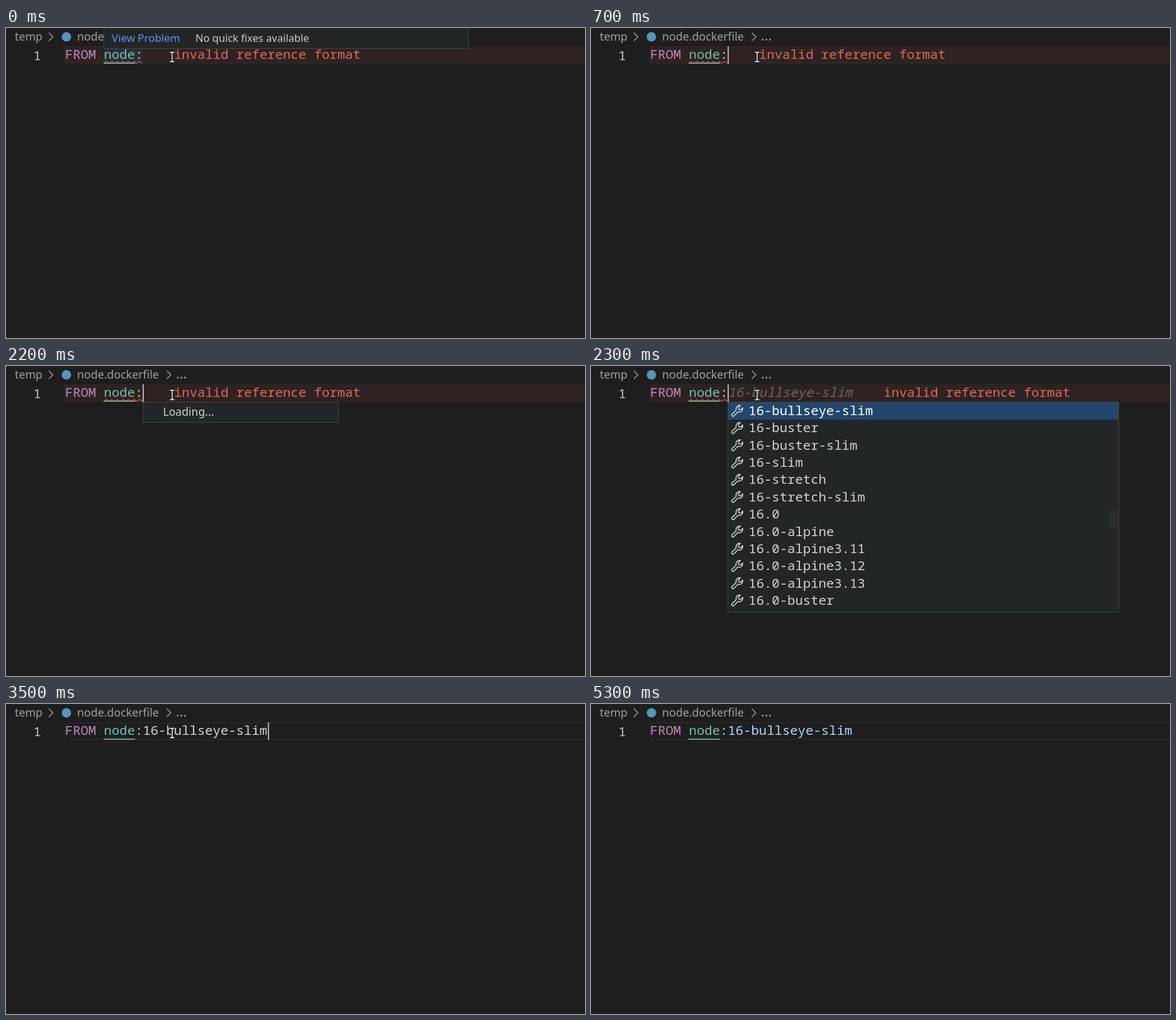
Animation of 920x492 px, one loop 5.6 s. Source, as an HTML page:

```html
<!DOCTYPE html>
<html lang="en">
<head>
<meta charset="utf-8">
<title>Image tag completion</title>
<style>
  html, body { margin: 0; width: 100%; height: 100%; overflow: hidden; background: #1e1e1e; }
  svg { display: block; width: 100%; height: 100%; }
  text { white-space: pre; }
  .code { font: 20.6px "Noto Sans Mono", "DejaVu Sans Mono", monospace; fill: #d4d4d4; }
  .ui { font: 17.8px "Noto Sans", "Open Sans", sans-serif; fill: #a0a0a0; }
  .panel { fill: #232626; stroke: #454545; }
  .line { fill: none; stroke: #a0a0a0; stroke-width: 1.4; }

  /* Every change is a hard cut on a shared 5.6 s clock. */
  .hover, .loading, .list, .slider, .error, .message, .ghost, .tag, .caret, .caret rect, .beam, .arrow {
    animation: 5.6s step-end infinite;
  }
  .hover { animation-name: hover; }
  .loading { animation-name: loading; }
  .list, .ghost { animation-name: list; }
  .slider { animation-name: slider; }
  .error { animation-name: error; }
  .message { animation-name: push; }
  .tag { animation-name: tag; }
  .caret { animation-name: jump; }
  .caret rect { animation-name: blink; }
  .beam { animation-name: beam; }
  .arrow { animation-name: arrow; }

  @keyframes hover {
    0% { opacity: 1; }
    1.785% { opacity: 0; }
    5.357% { opacity: .5; }
    7.142% { opacity: 1; }
    12.5%, 100% { opacity: 0; }
  }
  @keyframes loading {
    0% { opacity: 0; }
    14.285% { opacity: 1; }
    41.071%, 100% { opacity: 0; }
  }
  @keyframes list {
    0% { opacity: 0; }
    41.071% { opacity: 1; }
    62.5%, 100% { opacity: 0; }
  }
  @keyframes slider {
    0% { opacity: .2; }
    42.857%, 100% { opacity: 1; }
  }
  @keyframes error {
    0% { opacity: 1; }
    62.5%, 100% { opacity: 0; }
  }
  @keyframes push {
    0% { transform: none; }
    41.071%, 100% { transform: translateX(198px); }
  }
  @keyframes tag {
    0% { opacity: 0; fill: #d4d4d4; }
    62.5% { opacity: 1; fill: #d4d4d4; }
    67.857%, 100% { opacity: 1; fill: #b0d6fb; }
  }
  @keyframes jump {
    0% { transform: none; }
    62.5%, 100% { transform: translateX(199px); }
  }
  @keyframes blink {
    0%, 14.285%, 30.357%, 50%, 69.642%, 87.5%, 100% { opacity: 0; }
    5.357%, 23.214%, 39.285%, 58.928%, 78.571% { opacity: 1; }
  }
  @keyframes beam {
    0% { transform: translate(264px, 46px); opacity: 1; }
    87.5% { transform: translate(255px, 70px); opacity: 1; }
    89.285% { transform: translate(180px, 117px); opacity: 1; }
    91.071%, 100% { transform: none; opacity: 0; }
  }
  @keyframes arrow {
    0% { transform: none; opacity: 0; }
    91.071% { transform: translate(72px, 84px); opacity: 1; }
    92.857% { transform: translate(10px, 6px); opacity: 1; }
    94.642%, 100% { transform: none; opacity: 0; }
  }
</style>
</head>
<body>
<svg viewBox="0 0 920 492">
  <defs>
    <path id="wrench" fill="none" stroke="#d4d4d4" stroke-width="1.5" stroke-linejoin="round"
      d="M18.4 5.2a5.7 5.7 0 0 1-7.6 6.6L4.6 18.2a2 2 0 0 1-3-3L8.2 9A5.7 5.7 0 0 1 14.8 1.6L11.6 5l.6 2.9 2.9.6z"/>
    <path id="ibeam" fill="none" d="M-3.5-7.5h2.5l1 1 1-1h2.5M0-6.5v13M-3.5 7.5h2.5l1-1 1 1h2.5"/>
  </defs>

  <g class="ui">
    <text x="14" y="20">temp</text>
    <path class="line" d="M68 7.5l6.5 6.5-6.5 6.5M255.5 7.5l6.5 6.5-6.5 6.5"/>
    <circle cx="96" cy="14" r="7.5" fill="#5596b9"/>
    <text x="113" y="20">node.dockerfile</text>
    <text x="270" y="20" style="font-size:22px">…</text>
  </g>

  <path d="M920 30H94V56H920" fill="none" stroke="#282828" stroke-width="2"/>
  <rect class="error" x="94" y="30" width="826" height="26" fill="#2e2321"/>

  <rect class="hover" x="155" y="29" width="62" height="27" fill="#264f78" fill-opacity=".25"/>
  <g class="code">
    <text x="43.5" y="51" fill="#c6c6c6">1</text>
    <g transform="translate(0 49)">
      <text x="93.8" fill="#bd88bd">FROM</text>
      <text x="155.6" fill="#6cc4b0">node</text>
      <text x="205">:</text>
      <text class="tag" x="217.4">16-bullseye-slim</text>
      <text class="ghost" x="217.4" fill="#706461" font-style="italic">16-bullseye-slim</text>
      <g class="error">
        <text class="message" x="267" fill="#e2685f">invalid reference format</text>
      </g>
    </g>
  </g>
  <path class="error" id="squiggle" fill="none" stroke="#d9534f" stroke-width="1.2"/>
  <rect x="155" y="55" width="50" height="1.5" fill="#78c8b4"/>
  <g class="caret"><rect x="217" y="29" width="2" height="28" fill="#aeafad"/></g>

  <g class="hover ui">
    <rect class="panel" x="155.5" y="-5.5" width="579" height="38"/>
    <text x="168" y="22" style="font-size:16.9px;fill:#5a96f5">View Problem</text>
    <text x="301" y="22" style="font-size:16.5px;fill:#ccc">No quick fixes available</text>
  </g>

  <g class="loading ui">
    <rect class="panel" x="217.5" y="57.5" width="311" height="32"/>
    <text x="249.5" y="79" style="font-size:17.6px;fill:#d0d0d0">Loading...</text>
  </g>

  <g class="list code" id="list">
    <rect class="panel" x="217.5" y="57.5" width="621" height="333"/>
    <rect x="218" y="58" width="620" height="27" fill="#24466e"/>
    <rect class="slider" x="823" y="228" width="15" height="29" fill="#4a4c4c"/>
  </g>

  <g class="beam">
    <use href="#ibeam" stroke="#111" stroke-width="3.4"/>
    <use href="#ibeam" stroke="#fff" stroke-width="1.4"/>
  </g>
  <path class="arrow" d="M0 0v16l4-3.5 2.5 6 2.5-1-2.5-6h5z" fill="#111" stroke="#fff"/>
</svg>
<script>
  const tags = ["16-bullseye-slim", "16-buster", "16-buster-slim", "16-slim", "16-stretch",
    "16-stretch-slim", "16.0", "16.0-alpine", "16.0-alpine3.11", "16.0-alpine3.12",
    "16.0-alpine3.13", "16.0-buster"];
  const rowHeight = 27.36;

  document.getElementById("list").insertAdjacentHTML("beforeend", tags.map((tag, i) => `
    <g transform="translate(0 ${i * rowHeight})">
      <use href="#wrench" x="222.5" y="61"/>
      <text x="250.3" y="78"${i ? "" : ' fill="#fff"'}>${tag}</text>
    </g>`).join(""));

  const waves = Array.from({ length: 15 }, (_, i) => `L${155 + i * 4.4} ${i % 2 ? 53 : 56}`);
  document.getElementById("squiggle").setAttribute("d", "M155 56" + waves.join(""));
</script>
</body>
</html>
```
